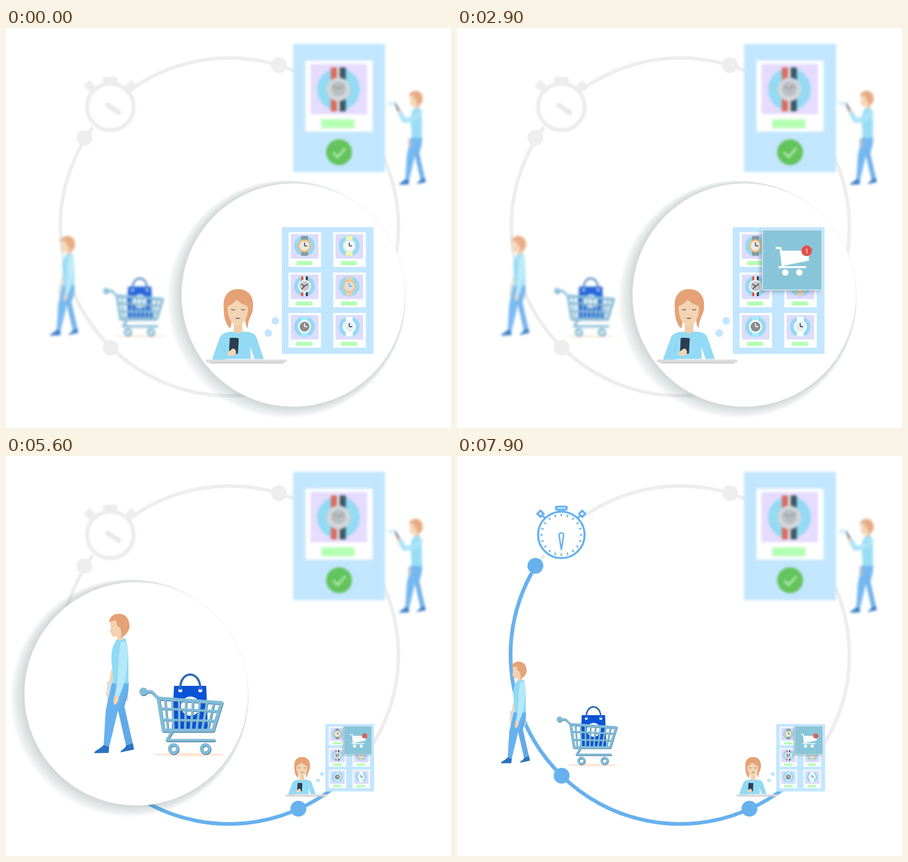
Write an HTML page that moves like this. It is 789 px wide and 710 px high and loops after 8 s.

```html
<!DOCTYPE html>
<html lang="en">
<head>
<meta charset="utf-8">
<title>Shopping journey</title>
<style>
html, body { margin: 0; width: 100%; height: 100%; overflow: hidden; background: #fff; }
svg { display: block; width: 789px; height: 710px; }
.soft { filter: blur(2px); }
.line { fill: none; stroke: #67b1ef; stroke-width: 6.5; }
.anim { animation: 8s step-end infinite; }
.browse { animation-name: browse; }
.tile { animation-name: tile; }
.hand { animation-name: tap; }
.shake { animation-name: shake; transform-origin: 594px 414px; }
.full { animation-name: full; }
.visit { animation-name: visit; }
.walk { animation-name: walk; }
.before { animation-name: before; }
.after { animation-name: after; }
.reach1 { animation-name: reach1; }
.reach2 { animation-name: reach2; }
.unreach2 { animation-name: unreach2; }
.arc1, .arc2 { stroke-dasharray: 100 200; animation: arc1 8s infinite; }
.arc2 { animation-name: arc2; }
@keyframes browse { 0% { visibility: visible } 42.5%, 100% { visibility: hidden } }
@keyframes tile {
  0% { opacity: 0; transform: translateY(12px) }
  12.5% { opacity: .5; transform: translateY(12px) }
  18.75%, 100% { opacity: 1; transform: none }
}
@keyframes tap { 0% { transform: none } 12.5% { transform: translate(1px, -2px) } 18.75%, 100% { transform: none } }
@keyframes shake {
  0% { transform: none }
  25% { transform: translateX(-1px) rotate(-1deg) }
  26.25% { transform: translateX(-2px) rotate(-2deg) }
  27.5% { transform: none }
  28.75% { transform: translateX(1px) rotate(1deg) }
  30% { transform: none }
  31.25% { transform: translateX(-2px) rotate(-2deg) }
  32.5% { transform: none }
  33.75% { transform: translateX(1px) rotate(1deg) }
  35%, 100% { transform: none }
}
@keyframes full { 0% { opacity: 0 } 36.25%, 100% { opacity: 1 } }
@keyframes visit { 0% { visibility: hidden } 63.75% { visibility: visible } 85%, 100% { visibility: hidden } }
@keyframes walk {
  0% { transform: translateX(16px) }
  70% { transform: none }
  72.5% { transform: translateX(-14px) }
  75% { transform: translateX(-28px) }
  77.5% { transform: translateX(-44px) }
  80% { transform: translateX(-60px) }
  82.5%, 100% { transform: translateX(-76px) }
}
@keyframes before { 0% { visibility: visible } 63.75%, 100% { visibility: hidden } }
@keyframes after { 0% { visibility: hidden } 85%, 100% { visibility: visible } }
@keyframes reach1 { 0% { visibility: hidden } 57.5%, 100% { visibility: visible } }
@keyframes reach2 { 0% { visibility: hidden } 98.75%, 100% { visibility: visible } }
@keyframes unreach2 { 0% { visibility: visible } 98.75%, 100% { visibility: hidden } }
@keyframes arc1 {
  0% { stroke-dashoffset: 101 }
  48.75% { stroke-dashoffset: 101; animation-timing-function: steps(8, start) }
  58.75%, 100% { stroke-dashoffset: 0 }
}
@keyframes arc2 {
  0% { stroke-dashoffset: 101 }
  91.25% { stroke-dashoffset: 101; animation-timing-function: steps(7, start) }
  100% { stroke-dashoffset: 0 }
}
</style>
</head>
<body>
<svg viewBox="0 0 789 710">
<defs>
  <g id="catalog"></g>

  <g id="tile">
    <rect x="537" y="361" width="106" height="108" fill="#456" opacity=".38" style="filter:blur(3px)"/>
    <rect x="541.5" y="358.5" width="105.5" height="106.5" fill="#89c5d9" stroke="#dcebf1" stroke-width="1.5"/>
  </g>
  <g id="cart" fill="none" stroke="#fff" stroke-width="3.5">
    <path d="M565 390.5H573.5L577.5 423M575 397H622V411.5L577 420.5M570 424.5H619"/>
    <g fill="#fff" stroke="none"><circle cx="582" cy="434" r="5.8"/><circle cx="607" cy="434" r="5.8"/></g>
  </g>
  <g id="full">
    <path d="M575 396H622V412L577 422Z" fill="#fff"/>
    <circle cx="620" cy="395.5" r="9.5" fill="#e0524a"/>
    <text x="620" y="399.5" text-anchor="middle" fill="#fff" font-family="Roboto, Arial, sans-serif" font-size="11">1</text>
  </g>

  <g id="buyer">
    <path fill="#e4a276" d="M386 497C384 474 396 463.500 411 463.500C428 463.500 440 474 438 497C437 511 428 517 429 533C423 528 424 515 424 502H398C400 517 401 529 397 533C388 524 386 510 386 497Z"/>
    <path fill="#efceaa" d="M404 518H419V538C421 544 402 544 404 538Z"/>
    <path fill="#f2d4b3" d="M393 494C400 491 405 487 409 482C414 488 422 491 429 494C430 512 422 528 411 528C400 528 392 512 393 494Z"/>
    <path fill="none" stroke="#3f3a3a" stroke-width="1.2" d="M399 499.500Q402.500 501.500 406 499.500M417 499.500Q420.500 501.500 424 499.500"/>
    <path fill="#4a3434" d="M405.500 514.500Q411 515 416.500 514.500Q411 518 405.500 514.500Z"/>
    <path fill="#93daf5" d="M404 539C392 539 383 541 379 550L366 586C366 594 376 594 382 591L390 587.500H457L444 549C441 541 432 539 419 539C415 543 408 543 404 539Z"/>
    <path fill="#fff" d="M433 566L434 587.500H441Z"/>
    <path fill="none" stroke="#7cc9e8" d="M389 560L386 577"/>
  </g>
  <g id="hold">
    <rect x="396" y="550" width="16" height="28" rx="2" fill="#2c3e50" transform="rotate(3 404 564)"/>
    <path fill="#f2d4b3" d="M394 575L402 569C407 569 409 574 407 579C403 583 396 582 392 580Z"/>
  </g>
  <g id="desk">
    <rect x="361" y="592" width="131" height="3.500" fill="#c9c9c9"/>
    <rect x="355" y="588.500" width="142" height="5" fill="#dcdcdc"/>
    <g fill="#c3e6ff"><circle cx="477.500" cy="520" r="6.700"/><circle cx="465" cy="541.500" r="6.700"/></g>
  </g>

  <g id="body">
    <path fill="#62a9e9" d="M196 402H217C219 420 213 432 210 445L225 511L213 515L196 440Z"/>
    <path fill="#67b1ef" d="M188 402H218C216 425 205 440 199 450L183 516L173 514L177 450Z"/>
    <path fill="#2872c0" d="M173 513L183 516L182 527L157 527.500C156 523 166 521 173 513ZM213 514L225 510L227 521L203 526C203 522 211 520 213 514Z"/>
    <path fill="#f2d2b0" d="M185 294L198 288L209 304L206 320L211 328H197V320C190 322 187 321 187 316L184 311L186 306Z"/>
    <path fill="#e4a276" d="M183 296C183 286 190 280 200 280C212 280 219 289 219 302C219 311 211 320 203 323C207 315 203 310 203 305C196 303 195 296 196 292C192 291 187 293 183 296Z"/>
    <path fill="#8fdaf5" d="M196 326C202 328 208 326 211 323C216 332 218 350 217 404H189C191 385 186 370 187 353C188 340 192 332 196 326Z"/>
  </g>
  <g id="walker">
    <path fill="#f2d2b0" d="M187 376L181 415L177 420L180 433L186 425L190 385Z"/>
    <path fill="#dcdcdc" d="M179 400H189L188 434H179ZM209 406L216 402L217 435L208 433Z"/>
    <use href="#body"/>
    <path fill="#b6e8f8" d="M203 332C210 325 216 330 216 345C216 375 212 405 200 428L193 425C198 400 199 380 200 360Z"/>
    <path fill="#f2d2b0" d="M193 424L200 427C201 434 196 441 192 442C189 437 191 430 193 424Z"/>
  </g>

  <g id="basket" fill="none" stroke="currentColor" stroke-linejoin="round" stroke-linecap="round"></g>
  <g id="trolley">
    <ellipse cx="325" cy="530" rx="63" ry="3" fill="#fae8d6"/>
    <path fill="#0a52d6" d="M298 408H355L358 486H294Z"/>
    <circle cx="327" cy="444" r="17" fill="#fff"/>
    <g fill="#fff"><circle cx="309" cy="416" r="3.500"/><circle cx="344.500" cy="416" r="3.500"/></g>
    <path fill="none" stroke="#2e6eb4" stroke-width="4" d="M309 415C307 379 346 379 344.500 415"/>
    <use href="#basket" color="#45758f" transform="translate(.8 1.200)"/>
    <use href="#basket" color="#82bcd9"/>
  </g>

  <g id="timer" fill="none" stroke="currentColor">
    <circle cx="185" cy="140" r="41.300"/>
    <rect x="175.500" y="90" width="19" height="5" rx="1.500"/>
    <path d="M181 95V99M189 95V99M148 97L153.500 102.500L148 108L142.500 102.500ZM222 97L227.500 102.500L222 108L216.500 102.500ZM151 105L157 111M219 105L213 111"/>
  </g>
</defs>

<circle cx="396" cy="353" r="299.700" fill="none" stroke="#eee" stroke-width="6.500"/>
<g id="arcs"></g>
<g fill="#eee"><circle cx="484" cy="66" r="14"/><circle cx="139" cy="195" r="14"/><circle cx="185.500" cy="567.500" r="14"/></g>
<g fill="#67b1ef">
  <circle cx="518.500" cy="626" r="14"/>
  <circle class="anim reach1" cx="185.500" cy="567.500" r="14"/>
  <circle class="anim reach2" cx="139" cy="195" r="14"/>
</g>

<circle cx="185" cy="140" r="48" fill="#fff"/>
<g class="anim unreach2"><g style="filter:blur(1.500px)" color="#ececec">
  <use href="#timer" stroke-width="7"/>
  <path d="M180 137L200 150" stroke="#e9e9e9" stroke-width="9" stroke-linecap="round"/>
</g></g>
<g class="anim reach2" color="#67b1ef">
  <use href="#timer" stroke-width="3.600"/>
  <g id="ticks" stroke="#67b1ef" stroke-width="2.400"></g>
  <path d="M185 166L181 141C180 135 190 135 189 141Z" fill="none" stroke="#67b1ef" stroke-width="2.600" stroke-linejoin="round"/>
</g>

<g class="soft">
  <rect x="509" y="28" width="163" height="228" fill="#c3e6ff"/>
  <rect x="531" y="58" width="119" height="126" fill="#fff"/>
  <rect x="540" y="64" width="100" height="89" fill="#e5dcff"/>
  <circle cx="589.500" cy="109" r="38" fill="#93daf2"/>
  <rect x="586" y="70" width="8" height="78" fill="#e6eaf0"/>
  <path d="M581.500 70V148" stroke="#da6c5e" stroke-width="11"/>
  <path d="M597 70V148" stroke="#3c5864" stroke-width="11"/>
  <circle cx="589.500" cy="109" r="21" fill="#d3d7db"/>
  <circle cx="589.500" cy="108" r="13" fill="#b9bec2"/>
  <path d="M580 103L589 108L599 102" fill="none" stroke="#9ca3a8" stroke-width="3"/>
  <rect x="559" y="162" width="59" height="16" fill="#b5ffb5"/>
  <circle cx="590.500" cy="220.500" r="23" fill="#63c35c"/>
  <path d="M580 221L588 229L602 213" fill="none" stroke="#b3e6ab" stroke-width="4"/>
</g>
<g class="soft" opacity=".9">
  <use href="#body" transform="translate(591.500 -77) scale(.673)"/>
  <path d="M735 148C732 158 720 163 706 164L698 149" fill="none" stroke="#a5e1f6" stroke-width="9" stroke-linejoin="round"/>
  <path d="M698 151L694 143" stroke="#f0d0b0" stroke-width="6"/>
  <path d="M689 133L697 147" stroke="#6f8794" stroke-width="4"/>
  <path d="M677 134H690" stroke="#d3effa" stroke-width="7"/>
  <path d="M716 196V212" stroke="#b9b9c2" stroke-width="5"/>
</g>

<g class="anim before"><g class="soft" opacity=".88">
  <use href="#walker" transform="translate(-34 168.800) scale(.715)"/>
  <use href="#trolley" transform="translate(1 164) scale(.723)"/>
</g></g>
<g class="anim after">
  <use href="#walker" transform="translate(-36.500 160.500) scale(.73)"/>
  <use href="#trolley" transform="translate(5.200 164.200) scale(.725)"/>
</g>

<g transform="translate(305.900 287.700) scale(.532)">
  <use href="#catalog"/><use href="#buyer"/><use href="#hold"/><use href="#desk"/>
</g>
<g transform="translate(344.500 311) scale(.47)">
  <use href="#tile"/><use href="#cart"/><use href="#full"/>
</g>

<g class="anim browse">
  <g id="lens1"></g>
  <use href="#catalog"/>
  <use href="#buyer"/>
  <g class="anim hand"><use href="#hold"/></g>
  <use href="#desk"/>
  <g class="anim tile">
    <use href="#tile"/>
    <g class="anim shake"><use href="#cart"/></g>
    <g class="anim full"><use href="#full"/></g>
  </g>
</g>

<g class="anim visit">
  <g id="lens2"></g>
  <use href="#trolley"/>
  <g class="anim walk"><use href="#walker"/></g>
</g>
</svg>
<script>
const put = (id, html) => { document.getElementById(id).innerHTML = html; };
const range = (n, fn) => Array.from({ length: n }, (_, i) => fn(i)).join('');
const rect = (x, y, w, h, fill) => `<rect x="${x}" y="${y}" width="${w}" height="${h}" fill="${fill}"/>`;
const disc = (x, y, r, fill) => `<circle cx="${x}" cy="${y}" r="${r}" fill="${fill}"/>`;

// strap, rim, dial, hands
const watches = [
  ['#8b979f', '#f6b96f', '#e9e9e6', '#2c3e50'],
  ['#f3f7a6', '#e4e8ea', '#f8f8f8', '#2c3e50'],
  ['#fff', '#f2f2f2', '#c6c9cc', '#444'],
  ['#ddd3bf', '#f9bd7c', '#dedede', '#5aa9e6'],
  ['#a6ecff', '#fff', '#8b8b8b', '#fff'],
  ['#fff', '#fff', '#e4eeee', '#2c3e50']
];

function card([strap, rim, dial, hands], i) {
  const x = 501 + (i % 2) * 79.3, y = 362.5 + Math.floor(i / 2) * 71.7;
  const cx = x + 28.3, cy = y + 24.2;
  const stripes = i === 2
    ? rect(cx - 6, cy - 17.5, 4, 35, '#d9534a') + rect(cx + 2, cy - 17.5, 4, 35, '#2c4454') : '';
  const pose = i === 2 ? 'l-6 -4m6 4l6 -4m-6 4l-5 5' : 'v-6m0 6h5';
  return rect(x, y, 57.5, 61.5, '#fff') + rect(x + 4, y + 3.5, 49, 43.5, '#dcdcfd')
    + disc(cx, cy, 18.3, '#93daf2') + rect(cx - 6, cy - 17.5, 12, 35, strap) + stripes
    + disc(cx, cy, 11.5, rim) + disc(cx, cy, 8.8, dial)
    + `<path d="M${cx} ${cy}${pose}" fill="none" stroke="${hands}" stroke-width="1.6"/>`
    + rect(x + 13.5, y + 51, 28.5, 7.5, '#b5ffb5');
}
put('catalog', rect(489, 353.5, 162.7, 225, '#c3e6ff') + watches.map(card).join(''));

const bars = range(8, i => `M${282 + i * 12.4} ${432 + i * .8}L${287 + i * 10.1} 487`);
put('basket', `
  <path stroke-width="5" d="M244 418H258L270 430"/>
  <circle cx="243.500" cy="418" r="4" stroke-width="6"/>
  <path stroke-width="6" d="M270 430L382 438L367 487H279Z"/>
  <path stroke-width="3.800" d="${bars}M273 448L377 453M276 468L372 470"/>
  <path stroke-width="4.500" d="M294 490L285 504.500H369"/>
  <g stroke-width="5.500"><circle cx="297" cy="519.500" r="7.200"/><circle cx="353.500" cy="519.500" r="7.200"/></g>`);

put('ticks', range(20, i =>
  `<path d="M185 102.500V107" transform="rotate(${i * 18} 185 140)"/>`));

// Layered offset discs give the banded shadow behind a lens.
const lens = (x, y) => range(7, i => {
  const k = 1 - i / 7;
  return `<circle cx="${x - 12 * k}" cy="${y + 7.2 * k}" r="${198.5 + 12.5 * k}" fill="#4a5c58" opacity=".034"/>`;
}) + `<circle cx="${x}" cy="${y}" r="198.300" fill="#fff" stroke="#e9eceb" stroke-width=".8"/>`;
put('lens1', lens(509.5, 474));
put('lens2', lens(231, 422));

const arc = (x1, y1, x2, y2, name) =>
  `<path class="line ${name}" pathLength="100" d="M${x1} ${y1}A299.700 299.700 0 0 1 ${x2} ${y2}"/>`;
put('arcs', arc(580, 590, 518.5, 626.5, '') + arc(507, 631.5, 185, 567, 'arc1') + arc(185, 567, 138.5, 197, 'arc2'));
</script>
</body>
</html>
```
